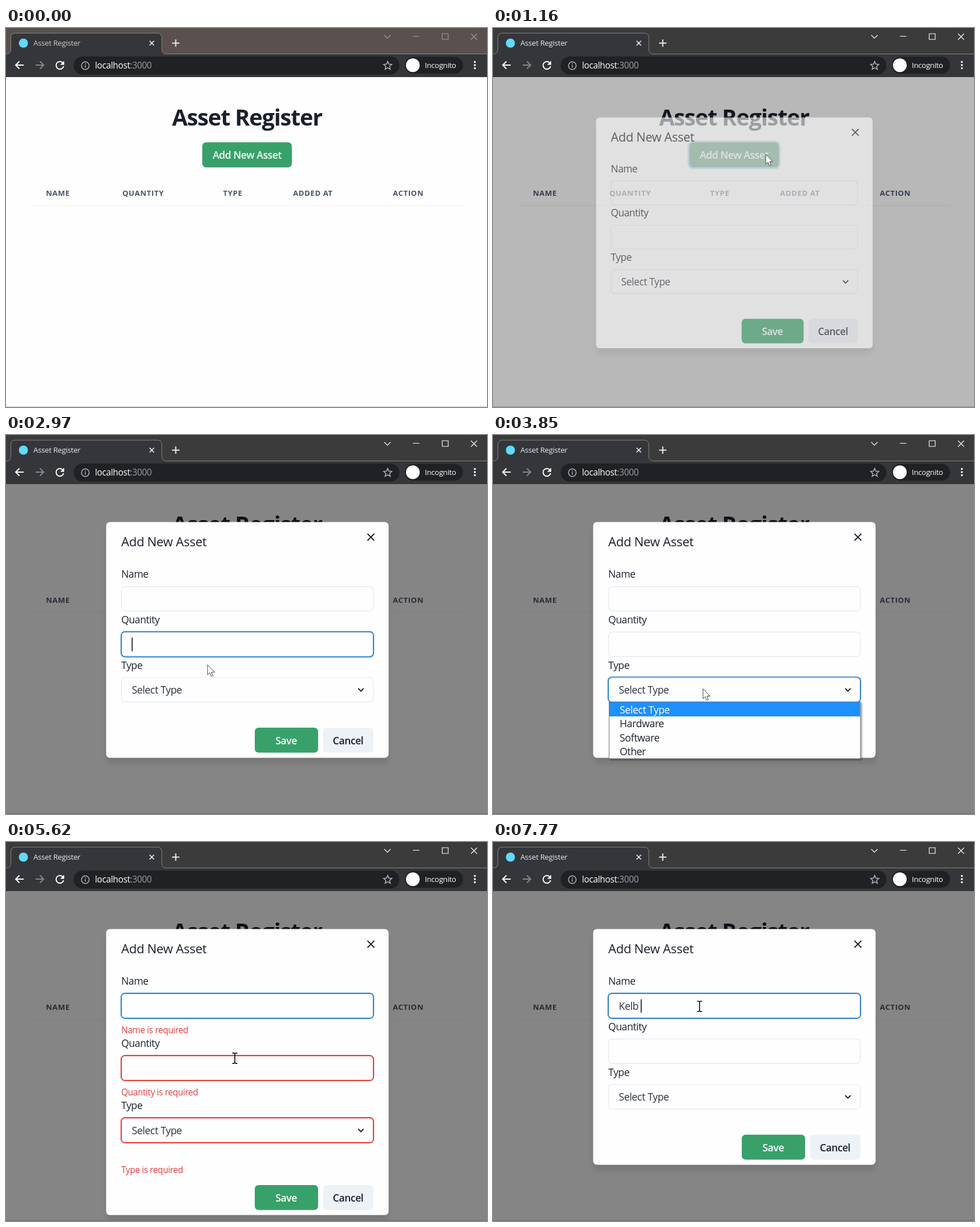
Write an HTML page that moves like this. It is 843 px wide and 664 px high and loops after 8 s.

```html
<!DOCTYPE html>
<html lang="en">
<head>
<meta charset="utf-8">
<title>Asset Register</title>
<style>
  html, body { margin: 0; width: 100%; height: 100%; overflow: hidden; background: #fff; }
  svg { display: block; width: 843px; height: 664px; }
  text { font: 400 17.6px "Open Sans", "Noto Sans", sans-serif; letter-spacing: -.021em; fill: #1a202c; white-space: pre; }
  .small { font-size: 13.2px; fill: #e8eaed; }
  .url { font-size: 15.4px; fill: #fff; }
  .title { font-size: 39.6px; font-weight: 700; letter-spacing: -.03em; text-anchor: middle; }
  .th text { font-size: 13.2px; font-weight: 700; letter-spacing: .045em; fill: #4a5568; }
  .btn { font-weight: 600; text-anchor: middle; letter-spacing: -.025em; }
  .label { font-weight: 500; letter-spacing: -.026em; }
  .head { font-size: 22px; font-weight: 500; letter-spacing: -.012em; }
  .err { font-size: 15.4px; letter-spacing: -.026em; fill: #e53e3e; }
  .value { fill: #2a313e; }
  .white { fill: #fff; }
  .icon { fill: none; stroke: #e8eaed; stroke-width: 2; }
  .bright { stroke: #fff; }
  .dim { stroke: #85868a; }
  .thin { stroke: #b0b4b8; stroke-width: 1.5; }
  .ring { fill: none; stroke: #4299e1; stroke-opacity: .5; stroke-width: 3; }
</style>
</head>
<body>
<svg viewBox="0 0 843 664" xmlns="http://www.w3.org/2000/svg">
  <defs>
    <filter id="shade" x="-10%" y="-10%" width="120%" height="125%">
      <feDropShadow dx="0" dy="10" stdDeviation="5" flood-opacity=".1"/>
    </filter>
    <filter id="pop" x="-5%" y="-10%" width="110%" height="125%">
      <feDropShadow dx="2" dy="2" stdDeviation="1.5" flood-opacity=".4"/>
    </filter>
  </defs>

  <!-- page -->
  <rect y="86" width="843" height="578" fill="#fefefe"/>
  <text class="title" x="422.5" y="170.5">Asset Register</text>
  <rect id="addRing" class="ring" x="342.5" y="198.7" width="160" height="47" rx="8"/>
  <rect id="add" x="344" y="200.2" width="157" height="44" rx="6.6"/>
  <text class="btn white" x="422.5" y="229">Add New Asset</text>
  <g class="th">
    <text x="70" y="293.8">NAME</text>
    <text x="204" y="293.8">QUANTITY</text>
    <text x="380.5" y="293.8">TYPE</text>
    <text x="503" y="293.8">ADDED AT</text>
    <text x="678" y="293.8">ACTION</text>
  </g>
  <path d="M43 311H802" stroke="#edf2f7" stroke-width="1.1"/>
  <path d="M0 663.5H843" stroke="#c8c8c8"/>
  <rect id="veil" y="86" width="843" height="578"/>

  <!-- browser window -->
  <rect id="bar" width="843" height="46"/>
  <rect y="45" width="843" height="41" fill="#35363a"/>
  <path d="M0 45.5H1Q8.5 45 8.5 37V17Q8.5 9 16.5 9H265Q273 9 273 17V37Q273 45.5 281 45.5H843" fill="#35363a" stroke="#858585"/>
  <circle cx="30.5" cy="26.5" r="8" fill="#61dafb"/>
  <text id="tab" class="small" x="48" y="31">Asset Register</text>
  <path class="icon" d="M251.5 22.5l8 8m0-8l-8 8" style="stroke-width:1.6"/>
  <path class="icon" d="M297.500 20v13M291 26.500h13"/>
  <path id="ctrl" fill="none" stroke-width="1.1" d="M663 12.5l5.5 5.5l5.5-5.5M713 14.5h11.5M764.5 10h10.5v10h-10.5zM815 10l10.5 10.5m0-10.5l-10.5 10.5"/>
  <path class="icon bright" d="M31 65H17.5M23.5 58.5L17 65l6.500 6.500"/>
  <path class="icon dim" d="M52 65h13.5M59.5 58.5L66 65l-6.500 6.500"/>
  <path class="icon bright" d="M100 61.5A6.7 6.700 0 1 0 101 67"/>
  <path d="M102 57.5v7h-7z" fill="#fff"/>
  <rect x="118.5" y="50" width="571" height="31.5" rx="15.7" fill="#202124"/>
  <circle class="icon thin" cx="139" cy="66" r="6.7"/>
  <path class="icon thin" d="M139 65v4.5M139 62v1.7"/>
  <text class="url" x="156" y="71">localhost<tspan fill="#9aa0a6">:3000</tspan></text>
  <path class="icon thin" d="M669 58.5l2 4.8l5.2.5l-3.9 3.5l1.2 5.2l-4.5-2.8l-4.5 2.8l1.2-5.2l-3.9-3.5l5.2-.5z"/>
  <rect x="699" y="50.5" width="102" height="29.500" rx="14.700" fill="#202124"/>
  <circle cx="713" cy="65.2" r="12" fill="#fff"/>
  <text class="small white" x="734" y="70">Incognito</text>
  <path d="M821.7 59.500v.01m0 5.500v.01m0 5.500v.01" stroke="#fff" stroke-width="3.600" stroke-linecap="round"/>

  <!-- dialog -->
  <g id="dialog">
    <rect id="panel" x="175.5" y="152.4" width="495" rx="6.6" fill="#fefefe" filter="url(#shade)"/>
    <text class="head" x="202" y="195.400">Add New Asset</text>
    <rect id="closeRing" class="ring" x="621" y="160.7" width="37" height="36.6" rx="7"/>
    <path d="M633.5 173l12 12m0-12l-12 12" stroke="#1a202c" stroke-width="1.9"/>
    <g id="rows"></g>
    <path id="chevron" fill="none" stroke="#1a202c" stroke-width="2" d="M617.3 444l4.7 4.7l4.7-4.7"/>
    <g id="foot">
      <rect id="saveRing" class="ring" x="434.7" y="511.4" width="113.6" height="46.4" rx="8"/>
      <rect id="save" x="436" y="512.7" width="111" height="43.8" rx="6.6"/>
      <text class="btn white" x="491" y="541.7">Save</text>
      <rect x="555.7" y="512.7" width="88.3" height="43.8" rx="6.6" fill="#edf2f7"/>
      <text class="btn" x="599.5" y="541.7">Cancel</text>
    </g>
    <rect id="caret" width="1.5" height="23.5"/>
  </g>

  <g id="list">
    <rect x="203.5" y="467.5" width="440.5" height="99.5" fill="#fefefe" stroke="#767676" filter="url(#pop)"/>
    <rect x="204" y="468" width="439.5" height="25" fill="#1e90ff"/>
    <text class="white" x="222" y="488">Select Type</text>
    <text x="222" y="512.4">Hardware</text>
    <text x="222" y="536.8">Software</text>
    <text x="222" y="561.2">Other</text>
  </g>

  <g id="mouse">
    <circle id="flash" cx="-1.3" cy="-.5" r="13" fill="#fff04a" opacity=".8"/>
    <path id="arrow" d="M0 0V17.6L3.9 14L6.6 20.3L9.4 19L6.7 13H12.3Z" fill="#fff" stroke="#444"/>
    <path id="beam" d="M-4.5-9H-1.5L0-8L1.5-9H4.5M0-8V8M-4.5 9H-1.5L0 8L1.5 9H4.5" fill="none" stroke="#111" stroke-width="1.7"/>
  </g>
</svg>

<script>
const LOOP = 8000;
const NS = "http://www.w3.org/2000/svg";
const $ = id => document.getElementById(id);
const set = (el, attrs) => { for (const k in attrs) el.setAttribute(k, attrs[k]); };
const show = (el, on) => { el.style.display = on ? "" : "none"; };

function make(parent, tag, attrs, text = "") {
  const el = document.createElementNS(NS, tag);
  set(el, attrs);
  el.textContent = text;
  return parent.appendChild(el);
}

// timing rules
const ramp = (t, from, dur = 170) => Math.min(1, Math.max(0, (t - from) / dur));
const pulse = (t, on, off) => ramp(t, on) - ramp(t, off);
const easeOut = p => p * (2 - p);
const easeBoth = p => p * p * (3 - 2 * p);

const mix = (a, b, p) => a.map((v, i) => v + (b[i] - v) * p);
const rgb = c => `rgb(${c.map(Math.round)})`;
const GREY = [226, 232, 240], BLUE = [49, 130, 206], RED = [229, 62, 62];
const GREEN = [56, 161, 105], DARK = [39, 103, 73];

// the story: clicks, validation, typing
const CLICK = { add: 830, name: 1870, qty: 2620, type: 3420, save: 4640, back: 6030 };
const OPEN = 1090, INVALID = 4780, BLUR = 5800, VALID = 6970;
const LIST = [3580, 3980];
const WORD = "Kelb ";
const KEYS = [6900, 7080, 7210, 7540, 7770];

// each leg of the pointer: leave, arrive, x, y
const HOME = [718, 655];
const LEGS = [
  [70, 690, 478, 221],
  [1460, 1860, 353, 282],
  [2010, 2180, 340, 391],
  [2410, 2560, 341, 368],
  [2760, 3210, 368, 444.5],
  [4140, 4560, 468, 534.5],
  [5150, 5950, 362, 288]
];

const ROW = 79.6, TOP = 265, HEIGHT = 44, ERROR = 29.4;
const rowTop = i => TOP + ROW * i;

function makeRow(name, i) {
  const g = make($("rows"), "g", {}), y = rowTop(i);
  const frame = inset => make(g, "rect", {
    x: 201.9 + inset, y: y + inset, width: 442.2 - 2 * inset, height: HEIGHT - 2 * inset,
    rx: 6.6 - inset, fill: "none", "stroke-width": 1.15
  });
  make(g, "text", { class: "label", x: 202, y: y - 14.7 }, name);
  const ring = frame(-.5), edge = frame(.55);
  const value = make(g, "text", { class: "value", x: 220.5, y: y + 29 }, name === "Type" ? "Select Type" : "");
  make(g, "text", { class: "err", x: 202, y: y + (name === "Type" ? 96.6 : 70) }, name + " is required");
  return { g, ring, edge, value };
}
const rows = ["Name", "Quantity", "Type"].map(makeRow);
const errors = document.querySelectorAll(".err");
const hasErrors = t => t >= INVALID && t < VALID;

const FOCUS = [
  t => pulse(t, CLICK.name, CLICK.qty) + ramp(t, INVALID),
  t => pulse(t, CLICK.qty, CLICK.type),
  t => pulse(t, CLICK.type, CLICK.save)
];

function paintPage(t, open) {
  const active = t >= CLICK.add + 60;
  set($("bar"), { fill: active ? "#3b3b3b" : "#5a504e" });
  set($("ctrl"), { stroke: active ? "#fff" : "#a39c9a" });
  $("tab").style.fill = active ? "#e8eaed" : "#cbc8c7";
  const shade = .45 * ramp(t, 520) + .55 * pulse(t, CLICK.add, CLICK.add + 170);
  set($("add"), { fill: rgb(mix(GREEN, DARK, shade)) });
  set($("addRing"), { opacity: ramp(t, CLICK.add) });
  set($("veil"), { opacity: .48 * open });
}

function paintRows(t) {
  const bad = hasErrors(t);
  errors.forEach(e => show(e, bad));
  rows.forEach((r, i) => {
    const focus = FOCUS[i](t);
    const wrong = i ? pulse(t, INVALID, VALID) : pulse(t, BLUR, CLICK.back);
    const stroke = rgb(mix(mix(GREY, BLUE, focus), RED, wrong));
    set(r.edge, { stroke });
    set(r.ring, { stroke, opacity: Math.max(focus, wrong) });
    set(r.g, { transform: `translate(0 ${bad ? ERROR * i : 0})` });
  });
  set($("chevron"), { transform: `translate(0 ${bad ? ERROR * 2 : 0})` });
  set($("foot"), { transform: `translate(0 ${bad ? ERROR * 3 : 0})` });
  set($("panel"), { height: 413 + (bad ? ERROR * 3 : 0) });
}

function paintCaret(t) {
  const name = rows[0].value, text = WORD.slice(0, KEYS.filter(k => t >= k).length);
  if (name.textContent !== text) name.textContent = text;
  const resets = [CLICK.name, CLICK.qty, INVALID, CLICK.back, ...KEYS].filter(r => t >= r);
  const since = resets.pop();
  const idle = since === undefined || (t >= CLICK.type && t < INVALID);
  show($("caret"), !idle && (t - since) % 1000 < 500);
  set($("caret"), {
    x: 220.3 + (text ? name.getComputedTextLength() : 0),
    y: rowTop(since === CLICK.qty ? 1 : 0) + 10.5
  });
}

function paintDialog(t, open) {
  show($("dialog"), open > 0);
  set($("dialog"), {
    opacity: open,
    transform: `translate(423 359) scale(${.95 + .05 * open}) translate(-423 -359)`
  });
  paintRows(t);
  paintCaret(t);
  set($("closeRing"), { opacity: pulse(t, OPEN + 140, CLICK.name) });
  const press = ramp(t, CLICK.save, 120) - ramp(t, INVALID + 10, 130);
  set($("save"), { fill: rgb(mix(GREEN, DARK, press)) });
  set($("saveRing"), { opacity: press });
  show($("list"), t >= LIST[0] && t < LIST[1]);
}

function paintMouse(t) {
  const [x, y] = LEGS.reduce((p, [from, to, ...goal]) =>
    mix(p, goal, easeBoth(ramp(t, from, to - from))), HOME);
  const inField = [0, 1].some(i => {
    const top = rowTop(i) + (hasErrors(t) ? ERROR * i : 0);
    return y > top && y < top + HEIGHT;
  });
  const beam = t > OPEN && inField;
  show($("mouse"), t >= LEGS[0][0]);
  set($("mouse"), { transform: `translate(${x} ${y})` });
  show($("beam"), beam);
  show($("arrow"), !beam);
  show($("flash"), Object.values(CLICK).some(c => t >= c && t < c + 140));
}

function draw(t) {
  const open = easeOut(ramp(t, OPEN, 200));
  paintPage(t, open);
  paintDialog(t, open);
  paintMouse(t);
}

const start = performance.now();
function tick() {
  draw((performance.now() - start) % LOOP);
  requestAnimationFrame(tick);
}
tick();
</script>
</body>
</html>
```
